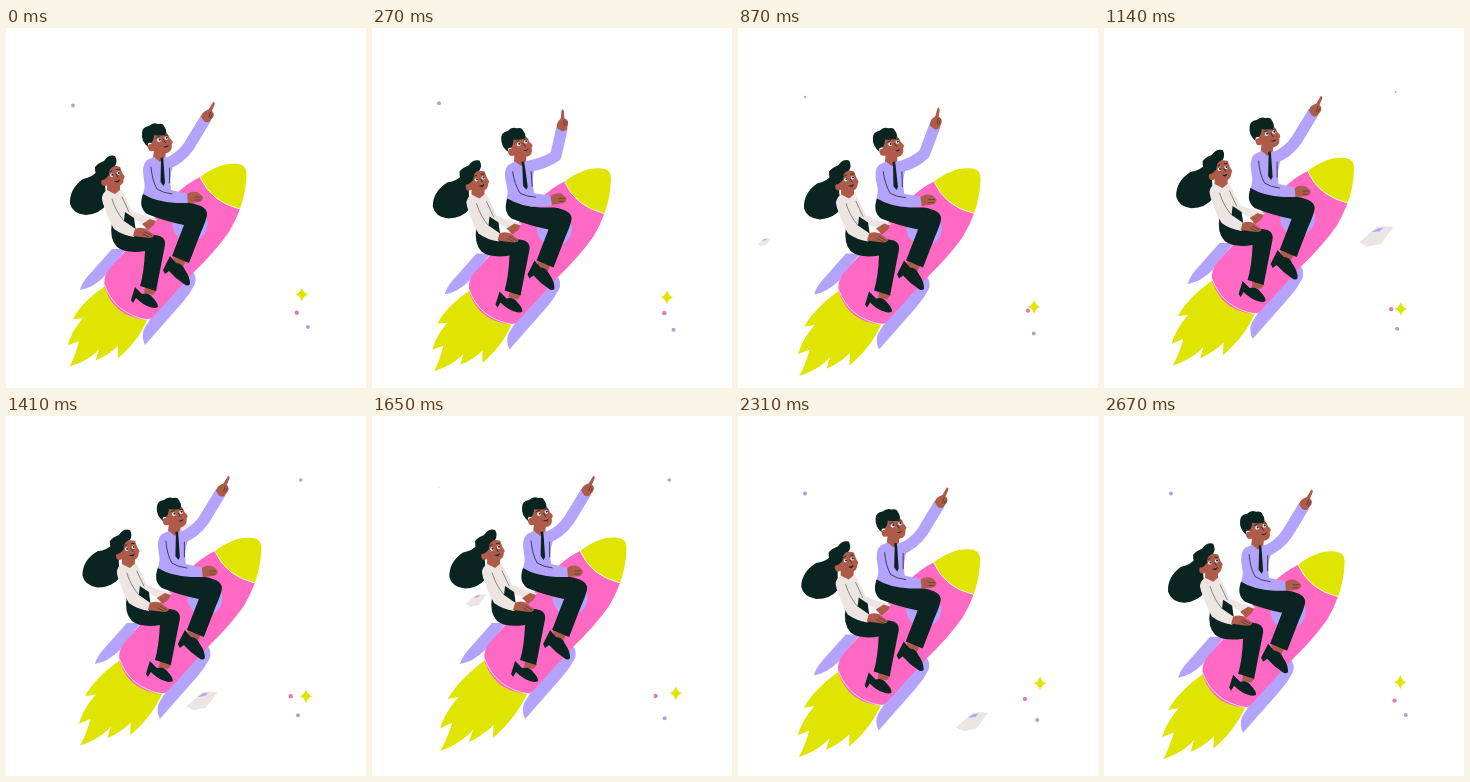
An HTML page that plays this animation: 360x360 px, repeating every 2.7 s.

```html
<!DOCTYPE html>
<html lang="en">
<head>
<meta charset="utf-8">
<title>Rocket ride</title>
<style>
  html, body { margin: 0; width: 100%; height: 100%; overflow: hidden; background: #fff; }
  svg { display: block; width: 100vw; height: 100vh; }
  .pink { fill: #ff69c4; }
  .lime { fill: #dfe500; }
  .lilac { fill: #b3a3fc; }
  .ink { fill: #0a2422; }
  .skin { fill: #ae5b4a; }
  .cream { fill: #ede5e1; }
  .line { fill: none; stroke: #1b2a2c; stroke-width: .8; stroke-linecap: round; }
  .fine { stroke-width: .5; }
  .seam { fill: none; stroke: #fff; stroke-width: .7; }
  .sleeve { fill: none; stroke: #b3a3fc; stroke-width: 11.5; stroke-linejoin: round; }
</style>
</head>
<body>
<svg viewBox="0 0 360 360">
  <g id="papers"></g>
  <path id="star" class="lime" d="M0-7.2Q1.4-1.6 6.2 0Q1.4 1.6 0 7.2Q-1.4 1.6-6.2 0Q-1.4-1.6 0-7.2Z"/>
  <circle id="rose" r="2.2" fill="#e27bb6"/>
  <circle id="low" r="2" fill="#aaa0ec"/>
  <circle id="left" r="2" fill="#aaa0ec"/>
  <circle id="right" r="1.8" fill="#aaa0ec"/>

  <g id="ride">
    <path id="flame" class="lime" d="M99 258C88 266 74 277 67 291L77 290C70 298 65 306 62 317L73 313C71 322 68 330 64 338C75 335 86 329 93 321L90 332C98 329 106 324 112 318L112 330C122 322 134 309 141 292Q110 286 99 258Z"/>
    <path class="lilac" d="M74 262Q76 255 82 248L106 221L120 221L99 248Q87 260 74 262Z"/>
    <path class="lilac" d="M186 243Q191 248 189 256Q184 266 176 275L139 317Q135 309 138 301L145 290Z"/>
    <path class="pink" d="M194 149Q181 155 168 168L105 239Q95 250 100 263Q109 285 130 290Q141 293 146 290L187 245Q208 225 223 204Q230 192 234 181Q205 174 194 149Z"/>
    <path class="lime" d="M194 149C209 138 220 134.500 232 136C238 137 240.500 140 240.500 147Q240 164 234 181Q205 174 194 149Z"/>
    <path class="seam" d="M194 149Q205 174 234 181M98.500 257Q109 286 142 292"/>
    <circle class="lilac" cx="184" cy="196" r="17.500"/>

    <g id="man">
      <path id="arm" class="sleeve"/>
      <g id="point">
        <path class="skin" d="M-5 1Q-6-4-3-7L-1.400-9L-.6-17.500Q1.200-18.500 1.800-16L2.200-9Q6-8 6-4L5 1Q4 4 0 4Z"/>
        <path class="line fine" d="M1.500-7L2-2M4-6L4-2"/>
      </g>
      <g id="torso">
        <path class="skin" d="M148 121L160 122L159 132L153 136L147 131Z"/>
        <path class="lilac" d="M148 129L154 134L159 129Q166 130 167 138Q163 150 165 162L183 166L181 176Q164 177 146 171L136 168Q140 160 138 152Q135 137 141 132Z"/>
        <path class="ink" d="M154.500 130L157 129.500L157.500 133L159 155L157.500 158L154.500 154L155 134Z"/>
        <path class="line" d="M145 139Q146 152 151 161Q157 165 166 166M163.500 140L163.500 155"/>
        <path class="skin" d="M181 166Q187 162 193 165L197 169Q197 173 193 174L182 175Z"/>
        <path class="line fine" d="M189 169L195 169M189 172L194 172"/>
        <g transform="translate(1 0) rotate(-8 152 112)">
          <path class="skin" d="M143 108Q151 101 160 105Q163 109 163 112Q166 115 165 117L164 118Q164 126 157 126Q149 126 146 122Q140 123 140 118Q140 114 144 115Z"/>
          <g fill="#fff"><circle cx="152" cy="112" r="1.900"/><circle cx="159.500" cy="111" r="1.800"/></g>
          <g class="ink"><circle cx="152.700" cy="111.700" r="1.100"/><circle cx="160" cy="110.700" r="1.100"/></g>
          <path class="line" d="M149.500 109.500L153 108.500M158 108L161 108.500M156.500 112L158 115.500"/>
          <path class="ink" d="M155 119Q158 120 161 118Q159 122 155 119Z"/>
        </g>
        <path class="ink" d="M142 119Q135 113 136 105Q136 99 143 98Q147 94 152 96Q157 95 158 98Q162 104 159 107Q152 108 148 107Q148 112 145 115Q141 114 142 119Z"/>
      </g>
      <path class="skin" d="M167 229L180 233L177 239L169 238Z"/>
      <path class="ink" d="M137 166Q150 174 170 175L184 175Q202 178 201 187Q200 193 195 204L183 235L166 228L178 197Q158 193 141 186Q132 179 137 166Z"/>
      <path class="ink" d="M164 228L170 235Q176 235 179 242Q184 249 184 256Q182 259 178 256Q170 251 163 243L159 246L157 242Z"/>
    </g>

    <g id="woman">
      <path id="hair" class="ink" d="M95 138L108 142L99 158L101 176Q94 186 80 187Q67 186 64 176Q63 161 77 151Q87 149 91 143Z"/>
      <path class="cream" d="M114 162Q121 171 126 183L136 187L151 191L147 197Q132 196 122 187Z"/>
      <path class="skin" d="M144 191L150 193L148 197L142 202L136 196Z"/>
      <path class="skin" d="M101 154L114 156L114 166L107 169L101 164Z"/>
      <path class="cream" d="M101 162L109 166L115 161Q121 171 125 184L127 197L107 203L106 190Q97 180 96 171Q96 165 101 162Z"/>
      <path class="ink" d="M119 184L128 190L130 204L117 201Z"/>
      <path class="skin" d="M139 259L151 262L147 267L138 265Z"/>
      <path class="ink" d="M106 194Q112 201 124 205L149 207Q160 208 159 217L150 263L134 258Q138 245 139 223Q120 226 111 219Q103 211 106 194Z"/>
      <path class="ink" d="M129 259L136 266Q143 264 147 270Q152 275 152 279Q149 281 144 279Q137 277 130 270L127 275L125 272Z"/>
      <path class="cream" d="M96 169Q101 162 107 169Q112 184 118 193L131 202L128 209Q116 207 108 201Q100 188 96 169Z"/>
      <path class="line fine" d="M106 171Q110 184 118 193M116 169L123 184"/>
      <path class="skin" d="M129 201Q136 198 141 202L148 207Q148 210 143 210L127 208Z"/>
      <path class="line fine" d="M139 204L146 208M137 206L143 209"/>
      <g transform="translate(-.5 0) rotate(-8 108 149)">
        <path class="skin" d="M101 142Q109 136 116 140Q117 146 118 148Q120 151 118 152Q117 159 110 159Q103 158 101 156Q95 158 95 153Q95 149 99 150Z"/>
        <g fill="#fff"><circle cx="106.500" cy="147" r="1.700"/><circle cx="113.500" cy="146" r="1.700"/></g>
        <g class="ink"><circle cx="107.200" cy="146.700" r="1"/><circle cx="114" cy="145.700" r="1"/></g>
        <path class="line" d="M104.500 143.500L107.500 142.500M112 142L115 142.500M111 147L112.500 150"/>
        <path class="ink" d="M108 153Q111 154 114 152Q112 157 108 153Z"/>
      </g>
      <path class="ink" d="M97 152Q88 148 89 139Q92 135 98 133Q103 126 109 128Q112 133 109 138Q102 140 103 147Q101 150 97 152Z"/>
    </g>
  </g>
</svg>
<script>
const LOOP = 2700, STEP = 30, TAU = 2 * Math.PI;
const { cos, sin, min, max } = Math;
const el = id => document.getElementById(id);
const lerp = (a, b, p) => a + (b - a) * p;
const mix = (a, b, p) => a.map((v, i) => lerp(v, b[i], p));
const clamp = v => min(1, max(0, v));
const put = (node, value) => node.setAttribute('transform', value);

// First two harmonics of the loop around a mean.
const wave = (a, mean, c1, s1, c2, s2) =>
  mean + c1 * cos(a) + s1 * sin(a) + c2 * cos(2 * a) + s2 * sin(2 * a);

// Each returns x, y and size for a loop angle.
const specks = {
  star: a => [wave(a, 299.2, -1.6, -5, -1.7, .5), 273.5 + 7.5 * cos(a - 2.8), 1],
  rose: a => [288 + 4.5 * cos(a - .9), 282.5 + 2.5 * cos(a - .5), 1],
  low: a => [297 + 5 * cos(a - .2), 303 - 4 * cos(2 * a), 1],
  left: a => [67, 73 + 5 * cos(a + .5), clamp(.95 + .95 * cos(a))],
  right: a => [279 + 30 * a / TAU, 64, clamp(-1.1 * cos(a - .6))]
};

// Papers blow down and left at one speed; odd ones pass nearer.
const DRIFT = .283;
const papers = [
  { from: 340, to: 880, x: 176, y: 64 },
  { from: 900, to: 1560, x: 340, y: 140 },
  { from: 1190, to: 1875, x: 234, y: 54 },
  { from: 2030, to: 2430, x: 313, y: 226 }
];
const sheet = '<g><path class="cream" d="M-18 7L1-10Q10-11 19-10L5 9Q-2 9-9 12Z"/><path class="lilac" d="M-5-4L2-8L8-9L4-5Z"/></g>';
el('papers').innerHTML = sheet.repeat(papers.length);
const sheets = [...el('papers').children];

const straight = { shoulder: [160, 136], bow: [174, 131], elbow: [183, 118], wrist: [200, 90] };
const bent = { shoulder: [153, 133], bow: [177, 130], elbow: [187, 127], wrist: [185.5, 98] };

function drawArm(bend) {
  const at = joint => mix(straight[joint], bent[joint], bend);
  el('arm').setAttribute('d', `M${at('shoulder')}Q${at('bow')} ${at('elbow')}L${at('wrist')}`);
  put(el('point'), `translate(${at('wrist')}) rotate(${lerp(26, -19, bend)})`);
  put(el('torso'), `rotate(${-7 * bend} 145 180)`);
}

function draw(t) {
  const a = TAU * t / LOOP;
  put(el('ride'), `translate(${wave(a, 4.7, -7.1, -3.8, 2.4, 1.1)} ${wave(a, -2.6, 6.4, 7.4, -3.8, -1.2)})`);
  put(el('hair'), `rotate(${2.5 - 2.5 * cos(3 * a)} 97 145)`);

  const stretch = 1.09 + .1 * cos(TAU * t / 90 - 2.6);
  put(el('flame'), `translate(120 276) rotate(131) scale(${stretch} 1) rotate(-131) translate(-120 -276)`);

  const u = t / 530 - 1;
  drawArm(clamp(1 - u * u) ** 2);

  for (const id in specks) {
    const [x, y, size] = specks[id](a);
    put(el(id), `translate(${x} ${y}) scale(${size})`);
  }

  papers.forEach(({ from, to, x, y }, i) => {
    const age = t - from, far = DRIFT * age;
    const size = lerp(1, i % 2 ? .8 : .35, age / (to - from));
    sheets[i].style.display = age >= 0 && t <= to ? '' : 'none';
    put(sheets[i], `translate(${x - far} ${y + far}) scale(${size})`);
  });
}

const start = performance.now();
function tick() {
  const t = (performance.now() - start) % LOOP;
  draw(Math.floor(t / STEP) * STEP);
  requestAnimationFrame(tick);
}
tick();
</script>
</body>
</html>
```
